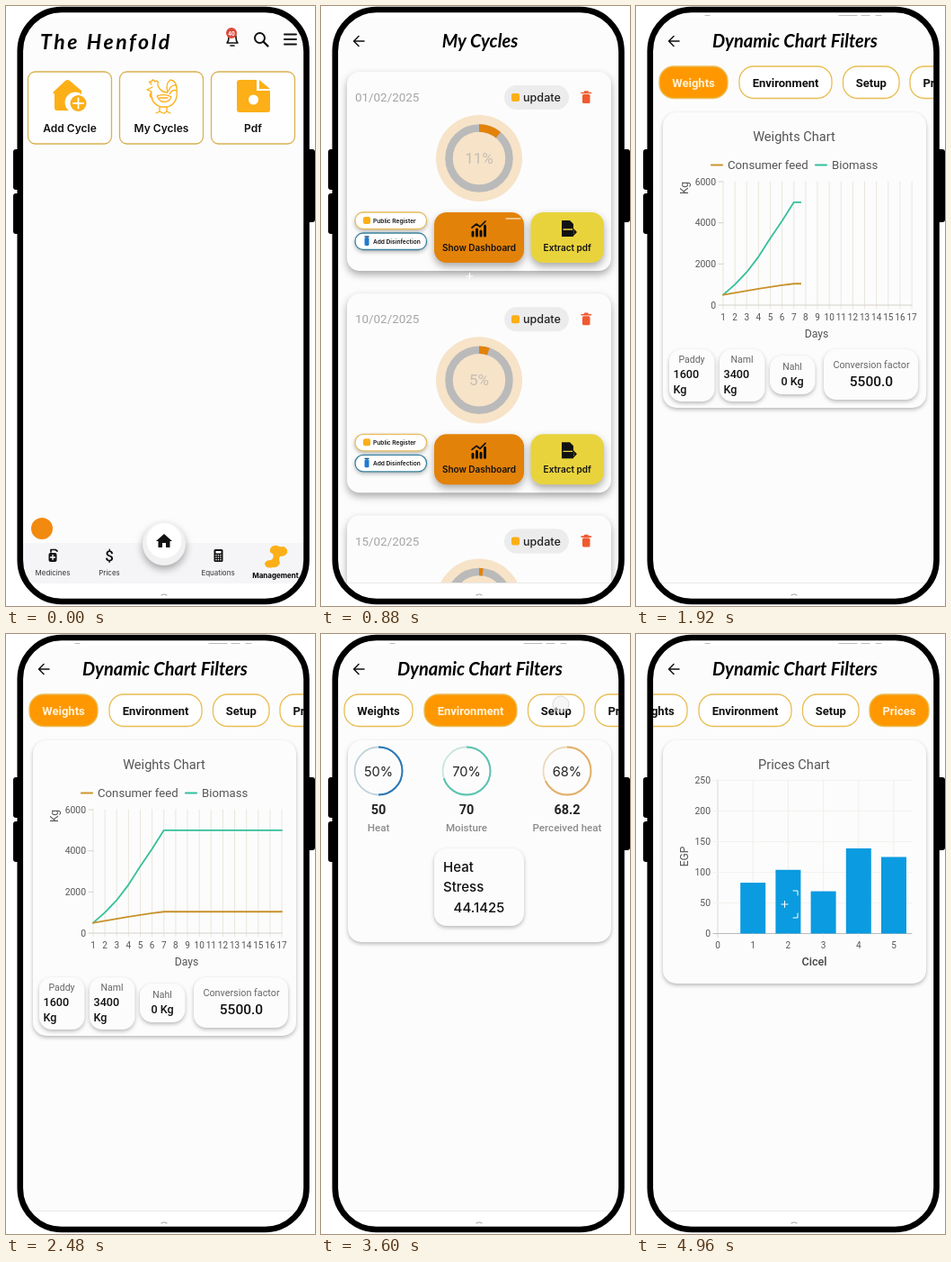
These frames come from a looping animation (344 by 666 pixels, 5.04 s). An HTML page:

```html
<!DOCTYPE html>
<html lang="en">
<head>
<meta charset="utf-8">
<title>Farm app tour</title>
<style>
  html, body { margin: 0; width: 100%; height: 100%; overflow: hidden; background: #fff; }
  svg { display: block; width: 344px; height: 666px; font-family: Roboto, sans-serif; }
  .inter { font-family: Inter, sans-serif; }
  .title { font: italic 700 20px Lato, sans-serif; }
  .brand { font: italic 700 23px Lato, sans-serif; letter-spacing: 2.6px; }
  .raised { filter: drop-shadow(0 2px 2px #0004); }
  .lifted { filter: drop-shadow(0 4px 4px #0005); }
  .line { fill: none; stroke-linecap: round; stroke-linejoin: round; }
</style>
</head>
<body>
<svg id="stage" viewBox="0 0 344 666"></svg>
<script>
const LOOP = 5040, STEP = 80;
const AMBER = '#fcaf17', ORANGE = '#ff9800', TEAL = '#35c09b', PAPER = '#fcfcfc';

const rect = (x, y, w, h, r, fill, more = '') =>
  `<rect x="${x}" y="${y}" width="${w}" height="${h}" rx="${r}" fill="${fill}" ${more}/>`;
const circle = (x, y, r, fill, more = '') => `<circle cx="${x}" cy="${y}" r="${r}" fill="${fill}" ${more}/>`;
const fill = (d, color, more = '') => `<path d="${d}" fill="${color}" ${more}/>`;
const line = (d, color, width, more = '') =>
  `<path class="line" d="${d}" stroke="${color}" stroke-width="${width}" ${more}/>`;
const text = (x, y, s, size, color = '#111', more = '') =>
  `<text x="${x}" y="${y}" font-size="${size}" fill="${color}" ${more}>${s}</text>`;
const mid = (x, y, s, size, color, more = '') => text(x, y, s, size, color, `text-anchor="middle" ${more}`);
const end = (x, y, s, size, color) => text(x, y, s, size, color, 'text-anchor="end"');
const group = (id, body) => `<g id="${id}">${body}</g>`;
const at = (x, y, body) => `<g transform="translate(${x} ${y})">${body}</g>`;
const card = (y, h) => rect(30, y, 293, h, 15, PAPER, 'class="raised"');
const range = (n, make) => Array.from({ length: n }, (_, i) => make(i)).join('');
const INTER = 'class="inter" font-weight="600"', INTER_MEDIUM = 'class="inter" font-weight="500"';
const BOLD = 'font-weight="700"', MEDIUM = 'font-weight="500"';
const screen = rect(12, 4, 326, 658, 40, '#fff') + rect(12, 13, 326, 628, 0, PAPER);

// Home
const tile = (x, label, icon) =>
  rect(x, 73, 93, 80, 8, '#fefefe', 'stroke="#d9b152" stroke-width="1.3"') + icon +
  mid(x + 46.5, 140, label, 12, '#111', INTER);

const house = fill('M52 96 66 83Q68.5 81 71 83L84 94V98A10.5 10.5 0 0 0 70 116H57Q54 116 54 113V98Z', AMBER) +
  circle(80.5, 108, 9, AMBER) + line('M75 108H86M80.5 102.5V113.5', '#fff', 1.8);
const rooster = line('M163 90 157 93 162 95Q158 101 163 102M162 87Q157 83 162 84Q163 80 166 84Q170 81 169 88' +
  'Q172 96 180 96Q177 86 183 82Q190 83 190 92Q192 108 180 112H172Q160 107 162 95' +
  'M181 94Q184 87 189 88M182 98Q185 92 190 94M168 100Q177 97 184 101Q181 108 173 106Q170 104 168 100M171 102H180' +
  'M171 112V117M167 119 171 117 175 119M179 112V117M176 119 179 117 183 119', AMBER, 1.3);
const pdfFile = fill('M260 82H279V94H294V115Q294 118 291 118H260Q257 118 257 115V85Q257 82 260 82ZM282 82 294 92H282Z', AMBER) +
  circle(275.5, 104, 5.5, '#fff');

const bell = line('M246 41Q248 39 248 35Q248 30 252 30Q256 30 256 35Q256 39 258 41ZM250 44H254', '#111', 1.6) +
  circle(251, 30, 6, '#dc4a3c') + mid(251, 32.5, '40', 6.5, '#fff', BOLD);
const navLabel = (x, s) => mid(x, 632, s, 8, '#333', 'class="inter"');

const home = screen + text(38, 48, 'The Henfold', 23, '#000', 'class="brand"') +
  bell + circle(282.5, 35.5, 5.5, 'none', 'stroke="#111" stroke-width="2"') +
  line('M287 40 291.5 44.5', '#111', 2.4) + line('M310 31.5H323M310 37H323M310 42.5H323', '#111', 1.9) +
  tile(24.5, 'Add Cycle', house) + tile(126.5, 'My Cycles', rooster) + tile(228.5, 'Pdf', pdfFile) +
  circle(40, 580, 12, '#f28a10') +
  rect(12, 596, 326, 45, 0, '#f5f5f8') +
  circle(176, 597, 24, '#f1f1f1', 'class="lifted"') + circle(176, 593.5, 19.5, '#fff') +
  fill('M167 594 176 586 185 594H182.5V601H178V596H174V601H169.5V594Z', '#111') +
  rect(47.5, 607, 9, 10, 2, '#111') + line('M50 606V603.5H55L57 605', '#111', 1.7) +
  line('M52 609.5V614.5M49.5 612H54.5', '#fff', 1.3) +
  mid(115, 616, '$', 17, '#111', MEDIUM) +
  rect(231.5, 603, 10, 14, 1.5, '#111') + rect(233.5, 605, 6, 2.5, 0, '#fff') +
  range(9, i => rect(233.3 + i % 3 * 2.5, 609 + Math.floor(i / 3) * 2.5, 1.3, 1.3, 0, '#fff')) +
  fill('M294 603Q296 598 302 599Q305 601 309 600Q314 602 313 607Q311 611 305 611Q303 614 305 618' +
    'Q303 624 297 623Q289 625 288 619Q289 615 295 615Q299 613 297 608Q293 607 294 603Z', AMBER) +
  navLabel(52, 'Medicines') + navLabel(115, 'Prices') + navLabel(236, 'Equations') +
  mid(300, 635, 'Management', 8, '#000', 'class="inter" font-weight="700"');

// Cycle list
const arc = (x, y, r, width, color, percent, more = '') =>
  circle(x, y, r, 'none', `stroke="${color}" stroke-width="${width}" pathLength="100"
    stroke-dasharray="${percent} 100" transform="rotate(-90 ${x} ${y})" ${more}`);
const smallPill = (y, label, stroke, icon) =>
  rect(38, y, 79.5, 18.5, 9, '#fff', `stroke="${stroke}" stroke-width="1.3" class="raised"`) + icon +
  text(58, y + 12, label, 6.6, '#111', INTER);
const bigButton = (x, w, color, label, icon) =>
  rect(x, 156, w, 56, 14, color, 'class="lifted"') + icon + mid(x + w / 2, 199, label, 10, '#111', INTER);

const cycleCard = (date, percent) =>
  rect(29, 0, 294, 221, 14, PAPER, 'class="lifted"') +
  text(38, 33, date, 13.4, '#a5a5a5') +
  rect(204, 15, 72, 27, 13.5, '#ececec') + rect(212, 24, 9, 9, 2, AMBER) +
  text(225, 33, 'update', 12.6, '#222', INTER_MEDIUM) +
  rect(291, 25, 8.5, 10, 1.5, '#f0592f') + line('M290 23.5H300.5M293.5 22H297', '#f0592f', 1.6) +
  circle(176, 96, 48, '#f7e3c8') + circle(176, 96, 33.5, 'none', 'stroke="#bababa" stroke-width="8.5"') +
  arc(176, 96, 33.5, 8.5, '#e38208', percent) +
  mid(176, 102, percent + '%', 17, '#c3bdb4') +
  smallPill(156, 'Public Register', '#e8bd5c', rect(47, 161, 8, 8, 2, AMBER)) +
  smallPill(179, 'Add Disinfection', '#38819f', rect(48.5, 184, 5, 9, 1.5, '#1f7bd0') + line('M49 183H53', '#174f8a', 1.3)) +
  bigButton(126, 100, '#e38208', 'Show Dashboard',
    line('M169 182V178M173.500 182V175M178 182V177M182.500 182V171', '#111', 3) +
    line('M168 173 173 169 177 172 183 166', '#111', 1.7)) +
  bigButton(233.5, 81.5, '#e9d33c', 'Extract pdf',
    fill('M268 165H277L281 169V183H268Z', '#111') + line('M270 175H280', '#e9d33c', 1.3) +
    line('M276 178H284M281 175 284 178 281 181', '#111', 1.6));

const header = title => screen + line('M37 39H48M42 33.5 36.5 39 42 44.5', '#111', 1.5) +
  mid(177, 46, title, 20, '#000', 'class="title"');
const footer = rect(12, 641, 326, 24, 0, '#fff') + line('M20 640.5H332', '#e9e9e9', 1);

const cycles = header('My Cycles') +
  [['01/02/2025', 11], ['10/02/2025', 5], ['15/02/2025', 2]]
    .map(([date, percent], i) => at(0, 73 + i * 246.3, cycleCard(date, percent))).join('') +
  line('M162 300H169M165.5 296.5V303.5M206 236H222', '#fff', 1) + footer;

// Dashboard
const tabs = [['Weights', 26, 76], ['Environment', 115, 103], ['Setup', 230.5, 62.5], ['Prices', 305, 66]];
const tabBar = tabs.map(([label, x, w], i) =>
  rect(x, 67, w, 35.5, 16, '#fff', `id="tab${i}" stroke="#e9bd55" stroke-width="1.3"`) +
  mid(x + w / 2, 89.5, label, 13, '#111', `id="label${i}" font-weight="700"`)).join('');

const dayX = day => 97 + (day - 1) * 13.13, kgY = kg => 332 - kg * 0.02283;
const plot = (values, color) =>
  line('M' + [...values, values[6]].map((v, i) => `${dayX(i < 7 ? i + 1 : 17)} ${kgY(v)}`).join('L'), color, 1.8);
const stat = (x, y, w, h) => rect(x, y, w, h, 14, PAPER, 'class="raised"');
const tallStat = (x, name, value) => stat(x, 381, 50.5, 58) + mid(x + 25, 396, name, 10.5, '#666') +
  text(x + 4.5, 413, value, 12.6, '#111', MEDIUM) + text(x + 4.5, 429.5, 'Kg', 12.6, '#111', MEDIUM);
const axisName = (y, s) => mid(0, 0, s, 12, '#555', `transform="translate(58 ${y}) rotate(-90)"`);

const weights = card(118, 328) + mid(176, 149.5, 'Weights Chart', 14.6, '#555') +
  line('M84 176.5H96', '#cc962f', 2.2) + text(102, 181, 'Consumer feed', 13.2, '#555') +
  line('M200 176.5H212', TEAL, 2.2) + text(218, 181, 'Biomass', 13.2, '#555') +
  range(17, i => line(`M${dayX(i + 1)} 195V336`, '#e9e6dc', 1) + mid(dayX(i + 1), 349, i + 1, 10, '#555')) +
  range(4, i => line(`M92 ${kgY(i * 2000)}H${i ? 97 : 307}`, '#d5d2ca', 1) + end(89, kgY(i * 2000) + 3.5, i * 2000, 10.4, '#555')) +
  axisName(202, 'Kg') + mid(201, 368, 'Days', 12.2, '#555') +
  `<clipPath id="reveal">${rect(95, 190, 0, 150, 0, '#000', 'id="revealBox"')}</clipPath><g clip-path="url(#reveal)">` +
  plot([500, 1000, 1600, 2350, 3250, 4100, 5000], TEAL) + plot([500, 600, 700, 790, 880, 970, 1040], '#c8922a') + '</g>' +
  tallStat(37, 'Paddy', '1600') + tallStat(93, 'Naml', '3400') +
  stat(149, 388, 50.5, 43) + mid(174, 404, 'Nahl', 10.5, '#666') + mid(174, 421, '0 Kg', 12.6, '#111', MEDIUM) +
  stat(209, 381, 105, 56) + mid(262, 402, 'Conversion factor', 10.8, '#666') +
  mid(262, 421.5, '5500.0', 15.5, '#111', MEDIUM);

const gauge = (x, percent, value, label, color, track) =>
  circle(x, 152, 26.5, 'none', `stroke="${track}" stroke-width="1.8"`) +
  arc(x, 152, 26.5, 2, color, percent, `class="gauge" data-percent="${percent}"`) +
  mid(x, 157.5, percent + '%', 14.6, '#222', 'class="inter"') + mid(x, 200, value, 14.5, '#222', BOLD) +
  mid(x, 218.5, label, 11.6, '#8c8c8c', MEDIUM);
const environment = card(118, 224) +
  gauge(64, 50, '50', 'Heat', '#2a78b8', '#bfd3d8') +
  gauge(162, 70, '70', 'Moisture', '#5cc3b2', '#c9e4de') +
  gauge(274, 68, '68.2', 'Perceived heat', '#e3b06a', '#ecd9bb') +
  stat(126, 238, 100, 86) + ['Heat', 'Stress'].map((s, i) => text(136, 264 + i * 22, s, 15, '#111', INTER_MEDIUM)).join('') +
  mid(176, 309, '44.1425', 15, '#111', INTER_MEDIUM);

// Slices run counter-clockwise from the top
const slices = [['Weight', 4, '#f5bf42', 140, 416.5], ['Live', 94, TEAL, 232, 389],
  ['Sick', 1, '#b3261a', 148, 389], ['Dead', 2, '#1565d8', 58, 389]];
const setup = card(118, 316) + '<g transform="translate(352 0) scale(-1 1)">' +
  slices.map(([, , color], i) => arc(176, 253, 91, 9, color, 0, `id="slice${i}"`)).join('') + '</g>' +
  mid(176, 261.5, '100%', 23, '#222', BOLD) +
  slices.map(([name, percent, color, x, y]) => circle(x, y, 5, color) +
    text(x + 11, y + 4.5, `${name}: ${percent}%`, 13, '#333')).join('');

const prices = [83, 104, 69, 139, 125], priceY = v => 332.5 - v * 0.68, catX = i => 91 + i * 39.2;
const priceChart = card(118, 270) + mid(176, 149.5, 'Prices Chart', 14.6, '#555') +
  range(6, i => line(`M${catX(i)} 162V337`, i ? '#efefea' : '#d8d8d4', 1) + mid(catX(i), 349, i, 10, '#555') +
    line(`M86 ${priceY(i * 50)}H307`, i ? '#f2f2ee' : '#bbb', 1) + end(83, priceY(i * 50) + 3.5, i * 50, 10.4, '#555')) +
  range(5, i => rect(catX(i + 1) - 14, 332, 28, 0, 0, '#0a9be0', `id="bar${i}"`)) +
  axisName(247, 'EGP') + mid(198.5, 368, 'Cicel', 12.6, '#444', MEDIUM) +
  group('focus', line('M162 300H169M165.5 296.5V303.5M175 285H180V290M175 315H180V310', '#fff', 1));

const dash = header('Dynamic Chart Filters') + group('tabBar', tabBar) +
  group('weights', weights) + group('environment', environment) + group('setup', setup) + group('prices', priceChart) +
  group('loader', circle(176, 127, 9, '#fff', 'class="raised"')) +
  line('M77 10.5H82M226 10.5H246M251 10.5H260M267 10.5H273', '#bbb', 1) + footer;

const stage = document.getElementById('stage');
stage.innerHTML = rect(8, 159, 10, 45, 3, '#000') + rect(8, 208, 10, 45, 3, '#000') + rect(334, 159, 10, 81, 3, '#000') +
  `<clipPath id="screen">${rect(15, 4, 320, 658, 45, '#000')}</clipPath><g clip-path="url(#screen)">` +
  group('home', home) + group('cycles', cycles) + group('dash', dash) + rect(12, 641, 326, 24, 0, '#fff') +
  line('M173 654Q176 652 179 654', '#aaa', 1.2) +
  group('touch', circle(0, 0, 9, '#eee', 'fill-opacity=".5" stroke="#ccc" stroke-opacity=".7"')) + '</g>' +
  rect(15.75, 4, 318.75, 657, 46, 'none', 'stroke="#000" stroke-width="6.6"');

const el = id => document.getElementById(id);
const ramp = (t, from, to) => Math.min(1, Math.max(0, (t - from) / (to - from)));
const easeOut = p => 1 - (1 - p) ** 3;
const fade = (id, opacity) => {
  el(id).style.opacity = opacity;
  el(id).style.display = opacity > 0 ? '' : 'none';
};
const during = (t, from, to) => t >= from && t < to;

const taps = [[320, 173, 113], [1200, 176, 256], [2720, 176, 85], [3520, 267, 78], [4320, 292, 85]];
const selections = [2720, 3680, 4400];
const loads = [[2960, 3280], [3760, 3920], [4480, 4560]];

function draw(t) {
  fade('cycles', ramp(t, 560, 720));
  fade('dash', ramp(t, 1520, 1760));

  const selected = selections.filter(s => t >= s).length;
  tabs.forEach((_, i) => {
    el('tab' + i).setAttribute('fill', i === selected ? ORANGE : '#fff');
    el('label' + i).setAttribute('fill', i === selected ? '#fff3dc' : '#111');
  });
  const scroll = -46.5 * easeOut(ramp(t, 3680, 4000)) + 1.5 * ramp(t, 4400, 4720);
  el('tabBar').setAttribute('transform', `translate(${scroll} 0)`);

  fade('weights', +(t < 2960));
  fade('environment', during(t, 3280, 3760) ? ramp(t, 3200, 3360) : 0);
  fade('setup', +during(t, 3920, 4480));
  fade('prices', +(t >= 4560));
  fade('loader', +loads.some(([from, to]) => during(t, from, to)));

  el('revealBox').setAttribute('width', 2 + 212 * ramp(t, 1680, 2265));
  const turn = easeOut(ramp(t, 3280, 3600));
  document.querySelectorAll('.gauge').forEach(g =>
    g.setAttribute('stroke-dasharray', `${g.dataset.percent * turn} 100`));

  const sweep = 0.903 * easeOut(ramp(t, 3840, 4320)) + 0.097 * ramp(t, 4320, 4480);
  let start = 0;
  slices.forEach(([, percent], i) => {
    const share = percent / 1.01 * sweep;
    el('slice' + i).setAttribute('stroke-dasharray', `0 ${start} ${share} 200`);
    start += share;
  });

  const grow = easeOut(ramp(t, 4560, 4960));
  prices.forEach((v, i) => {
    const y = priceY(v * grow);
    el('bar' + i).setAttribute('y', y);
    el('bar' + i).setAttribute('height', 332.5 - y);
  });
  fade('focus', +(t >= 4880));

  const tap = taps.find(([from]) => during(t, from, from + 320));
  fade('touch', tap ? 1 - ramp(t, tap[0] + 80, tap[0] + 320) : 0);
  if (tap) el('touch').setAttribute('transform', `translate(${tap[1]} ${tap[2]})`);
}

const begin = performance.now();
function tick() {
  const t = (performance.now() - begin) % LOOP;
  draw(Math.floor(t / STEP) * STEP);
  requestAnimationFrame(tick);
}
tick();
</script>
</body>
</html>
```
